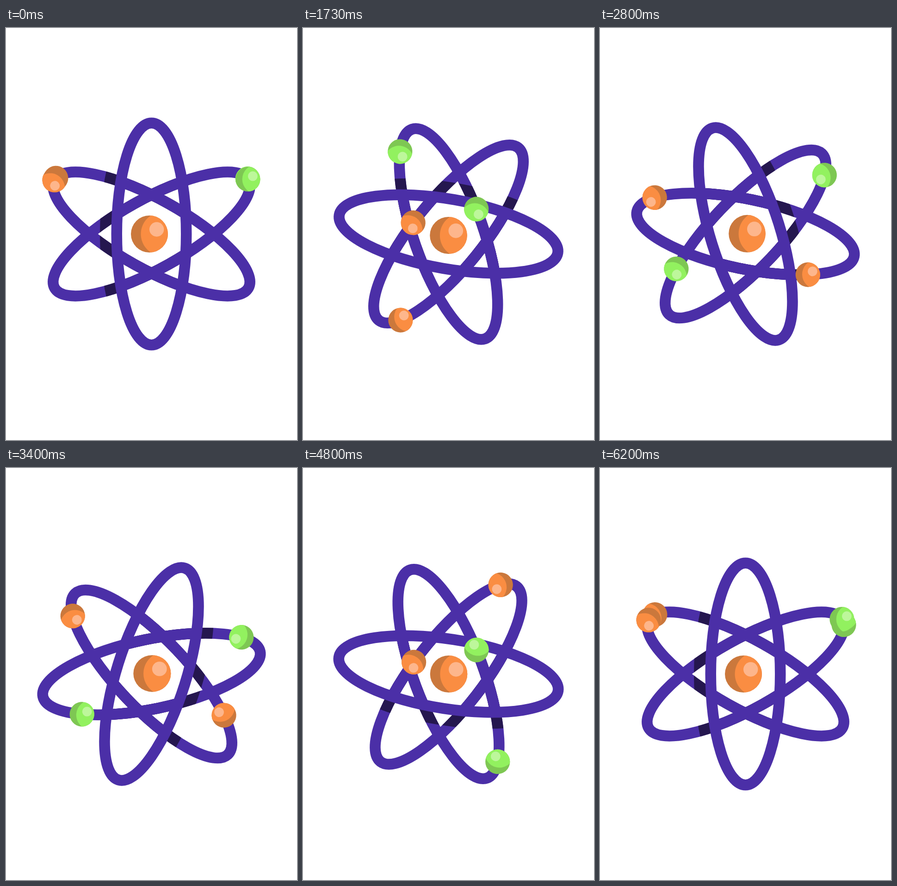
An HTML page with a canvas that plays this animation: 629x890 px, repeating every 6.23 s.

```html
<!DOCTYPE html>
<html lang="en">
<head>
<meta charset="utf-8">
<title>Atom</title>
<style>
  html, body { margin: 0; width: 100%; height: 100%; overflow: hidden; background: #fff; }
  canvas { display: block; width: 629px; height: 890px; }
</style>
</head>
<body>
<canvas id="stage" width="629" height="890"></canvas>
<script>
const ctx = document.getElementById('stage').getContext('2d');
const TAU = Math.PI * 2, RAD = Math.PI / 180;
const LOOP = 6230, LAST = 155, FRAMES = 156;
const CX = 314.5, CY = 445;
const A = 239.75, B = 75.25, LINE = 23.5, TILT = 60.9 * RAD, SHADE = 24.5;
const PURPLE = '#4b2fa7', DARK = '#25174f';
const ORANGE = { base: '#fa8d42', dark: '#cb783c', shine: '#fdb68c' };
const GREEN = { base: '#92f15f', dark: '#7ec753', shine: '#bdf79b' };

// nucleus sway: step, x, y, half width, half height
const SWAY = [
  [0, 310, 445, 40, 40], [20, 312.5, 442.5, 39.5, 40.5], [43, 314.5, 448, 40.3, 40],
  [70, 318, 444.3, 39.8, 40.5], [100, 313.7, 443.5, 41.3, 39], [120, 315, 445, 40.3, 40],
  [155, 310, 445, 40, 40]
];

// cumulative arc length of the orbit, for even speed along it
const STEPS = 1440;
const arc = [0];
for (let i = 0; i < STEPS; i++) {
  const s = (i + 0.5) / STEPS * TAU;
  arc.push(arc[i] + Math.hypot(A * Math.sin(s), B * Math.cos(s)) * TAU / STEPS);
}
const LENGTH = arc[STEPS];

function angleAt(dist) {
  const d = ((dist % LENGTH) + LENGTH) % LENGTH;
  let lo = 0, hi = STEPS;
  while (hi - lo > 1) {
    const mid = (lo + hi) >> 1;
    if (arc[mid] <= d) lo = mid; else hi = mid;
  }
  return (lo + (d - arc[lo]) / (arc[hi] - arc[lo])) / STEPS * TAU;
}

function ring(tilt, color) {
  ctx.beginPath();
  ctx.ellipse(0, 0, B, A, tilt, 0, TAU);
  ctx.lineWidth = LINE;
  ctx.strokeStyle = color;
  ctx.stroke();
}

function sideRings(color) {
  ring(TILT, color);
  ring(-TILT, color);
}

function clipped(dx, grow, color) {
  ctx.save();
  ctx.beginPath();
  ctx.ellipse(dx, 0, B + grow, A + grow, 0, 0, TAU);
  ctx.clip();
  sideRings(color);
  ctx.restore();
}

function disc(x, y, r, color) {
  ctx.beginPath();
  ctx.arc(x, y, r, 0, TAU);
  ctx.fillStyle = color;
  ctx.fill();
}

function ball(x, y, rx, ry, turn, skin) {
  ctx.save();
  ctx.translate(x, y);
  ctx.rotate(turn);
  ctx.scale(rx / 40, ry / 40);
  disc(0, 0, 40, skin.dark);
  ctx.save();
  ctx.beginPath();
  ctx.arc(0, 0, 40, 0, TAU);
  ctx.clip();
  disc(29.2, 0, 47.7, skin.base);
  ctx.restore();
  disc(15.7, -10, 15.7, skin.shine);
  ctx.restore();
}

// travels counter-clockwise from the upper end of a ring
function electron(dist, tilt, spin, skin, follow) {
  const s = -angleAt(dist), phi = spin + tilt;
  const sin = Math.sin(phi), cos = Math.cos(phi);
  const along = (u, v) => [u * sin + v * cos, -u * cos + v * sin];
  const [x, y] = along(A * Math.cos(s), B * Math.sin(s));
  const [tx, ty] = along(A * Math.sin(s), -B * Math.cos(s));
  ball(CX + x, CY + y, 26.6, 26.6, follow ? Math.atan2(ty, tx) : spin, skin);
}

function nucleus(k) {
  let i = 0;
  while (i < SWAY.length - 2 && SWAY[i + 1][0] <= k) i++;
  const from = SWAY[i], to = SWAY[i + 1];
  const p = (k - from[0]) / (to[0] - from[0]);
  const [, x, y, rx, ry] = from.map((v, n) => v + (to[n] - v) * p);
  ball(x, y, rx, ry, 0, ORANGE);
}

function draw(time) {
  // 25 steps a second shown on a 30 Hz clock
  const tick = Math.floor((Math.floor(time % LOOP / 10) * 10 + 3.34) * 0.03);
  const k = Math.min(LAST, Math.floor(tick * 5 / 6 + 1e-6));
  const spin = k / LAST * TAU;
  const slow = k / LAST * LENGTH, fast = 2 * k / FRAMES * LENGTH;

  ctx.fillStyle = '#fff';
  ctx.fillRect(0, 0, 629, 890);

  ctx.save();
  ctx.translate(CX, CY);
  ctx.rotate(spin);
  sideRings(PURPLE);
  clipped(-SHADE, LINE / 2, DARK);
  clipped(0, 0, PURPLE);
  ring(0, PURPLE);
  ctx.restore();

  nucleus(k);
  electron(fast - 5, -TILT, spin, ORANGE, true);
  electron(slow, -TILT, spin, ORANGE, true);
  electron(fast + 3, TILT, spin, GREEN, true);
  electron(slow + 2, TILT, spin, GREEN, false);
}

const start = performance.now();
function loop() {
  draw(performance.now() - start);
  requestAnimationFrame(loop);
}
loop();
</script>
</body>
</html>
```
